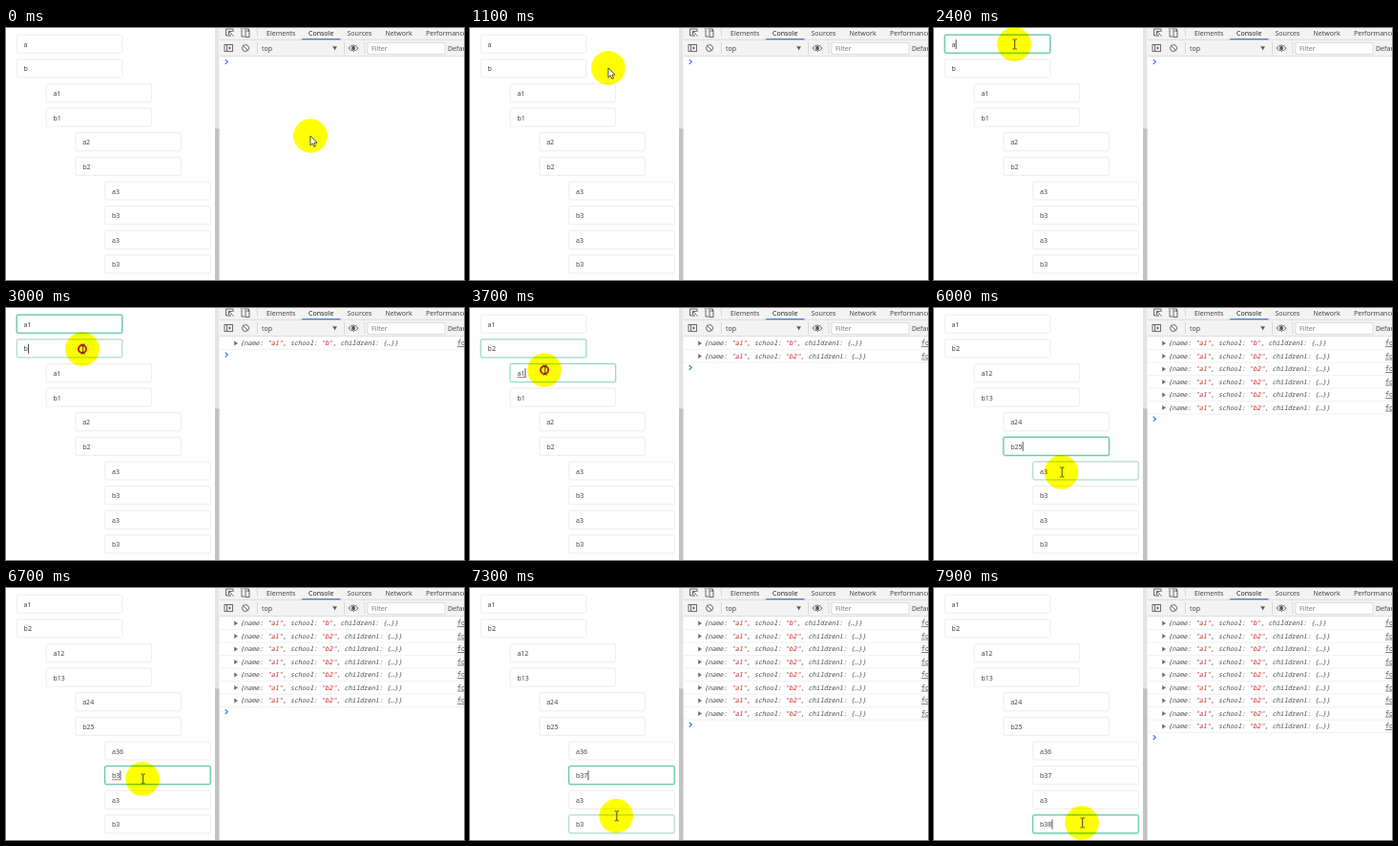
An HTML page for the animation above (8000 ms loop, 480 by 264 pixels).

```html
<!DOCTYPE html>
<html lang="en">
<head>
<meta charset="utf-8">
<style>
html, body { margin: 0; width: 100%; height: 100%; overflow: hidden; background: #fff; }
svg { display: block; width: 480px; height: 264px; }
text { font: 7px "Noto Sans", "Open Sans", sans-serif; fill: #444; white-space: pre; }
.log text { font: italic 6.74px "Noto Sans Mono", "DejaVu Sans Mono", monospace; }
.str { fill: #c41a16; }
.line { stroke: #d4d4d4; stroke-width: .8; fill: none; }
.icon { stroke: #5a5a5a; stroke-width: .9; fill: none; }
</style>
</head>
<body>
<svg id="stage" viewBox="0 0 480 264">
  <rect width="480" height="264" fill="#fff"/>
  <g id="form"></g>
  <g id="tools">
    <rect x="219" width="4.5" height="264" fill="#e4e4e4"/>
    <rect x="219" y="105.5" width="4.5" height="159" fill="#c2c2c2"/>
    <rect x="223.5" width="257" height="29.3" fill="#f3f3f3"/>
    <path class="line" d="M223.5 12.2H480M223.5 29.4H480M263.5 0V9M263.5 15V27M354.5 15V27M376 15V27"/>
    <rect x="310" y="11" width="40.5" height="1.4" fill="#4b84cf"/>
    <g class="icon">
      <path d="M236 8H230.5V1H238V4M233.5 3.5L238.5 8.5M233.5 3.5V7.5M233.5 3.5H237.5"/>
      <path d="M247 0V9H250M249 1H254.5V4"/>
      <rect x="251" y="3" width="4" height="6.5"/>
      <rect x="229" y="17.5" width="8.5" height="7"/>
      <path d="M231.5 17.5V24.5"/>
      <path d="M233.5 19.2V22.8L236 21Z" fill="#5a5a5a" stroke="none"/>
      <circle cx="251" cy="21" r="3.5"/>
      <path d="M248.6 18.6L253.4 23.4"/>
      <path d="M359 21Q364 15 369 21Q364 27 359 21Z"/>
      <circle cx="364" cy="21" r="1.6" fill="#5a5a5a"/>
    </g>
    <path d="M342.3 19.2H347L344.65 23.2Z" fill="#5a5a5a"/>
    <rect x="379" y="15.3" width="81" height="12" class="line" style="fill:#fff"/>
    <text x="383" y="24.2" style="fill:#808080">Filter</text>
    <text x="268" y="23.8">top</text>
    <text x="463" y="23.8">Default levels</text>
  </g>
  <g id="logs"></g>
  <path id="prompt" d="M229.7 -2.4L232.3 0L229.7 2.4" fill="none" stroke="#3b7ded" stroke-width="1.2"/>
  <circle id="halo" r="17.8" fill="#ff0" style="mix-blend-mode:multiply"/>
  <circle id="ring" r="4" fill="none" stroke="#c8201c" stroke-width="2"/>
  <path id="arrow" d="M0 0V9.8L2.3 7.8L3.9 11.3L5.5 10.6L4 7.2H7Z" fill="#fff" stroke="#222" stroke-width=".8"/>
  <path id="beam" d="M-1.5 -5H.1L.7 -4.4L1.3 -5H2.9M.7 -4.4V4.4M-1.5 5H.1L.7 4.4L1.3 5H2.9" fill="none" stroke="#333" stroke-width=".9"/>
</svg>
<script>
const LOOP = 8000, STEP = 100;
const $ = id => document.getElementById(id);
const clamp = v => Math.max(0, Math.min(1, v));
const show = (el, on) => el.setAttribute('visibility', on ? 'visible' : 'hidden');
const place = (el, x, y) => el.setAttribute('transform', `translate(${x} ${y})`);

// text, indent level, added character, click time, typing time
const fields = [
  ['a', 0, '1', 1400, 2700], ['b', 0, '2', 3000, 3300],
  ['a1', 1, '2', 3600, 4000], ['b1', 1, '3', 4300, 4500],
  ['a2', 2, '4', 4900, 5200], ['b2', 2, '5', 5500, 5700],
  ['a3', 3, '6', 6100, 6300], ['b3', 3, '7', 6500, 7000],
  ['a3', 3], ['b3', 3, '8', 7400, 7700]
].map(([text, level, add, click = Infinity, typed = Infinity], i) =>
  ({ text, add, click, typed, blur: Infinity, x: 11.3 + level * 30.8, y: 7.2 + i * 25.63 }));
const active = fields.filter(f => f.add);
active.slice(1).forEach((f, i) => active[i].blur = f.click);

// start, end, target x, target y
const moves = [
  [700, 1300, 84, 17], [2700, 3000, 80, 43], [3400, 3600, 78, 65],
  [4000, 4300, 82, 93], [4500, 4800, 110, 118], [5200, 5500, 120, 145],
  [5700, 6000, 133.5, 172], [6300, 6500, 143, 200], [7000, 7400, 155, 246]
];

for (const f of fields) {
  $('form').insertAdjacentHTML('beforeend', `<g transform="translate(${f.x} ${f.y})">
    <rect width="110.5" height="19" rx="1.5" fill="#fff" stroke="#e6e8ea" stroke-width=".8"/>
    <rect x="-.3" y="-.3" width="111.1" height="19.6" rx="2" fill="none" stroke="#19be90" stroke-width="2" opacity="0"/>
    <rect width="110.5" height="19" rx="1.5" fill="none" stroke="#52c0a0" stroke-width=".9" opacity="0"/>
    <text x="7.3" y="12.6">${f.text}</text>
    <path d="M7.3 14.2h8" stroke="#d33" stroke-width=".8"/>
    <path d="M0 4.8V14.8" stroke="#222" stroke-width=".8"/></g>`);
  [, f.glow, f.edge, f.label, f.spell, f.caret] = $('form').lastChild.children;
}

const str = s => `<tspan class="str">"${s}"</tspan>`;
const rows = active.map((f, i) => {
  const y = 37 + i * 13.5;
  $('logs').insertAdjacentHTML('beforeend', `<g class="log">
    <path d="M239.2 ${y - 2.5}V${y + 2.5}L243 ${y}Z" fill="#6e6e6e"/>
    <text x="245.4" y="${y + 2.2}">{name: ${str('a1')}, school: ${str(i ? 'b2' : 'b')}, children1: {…}}</text>
    <text x="473" y="${y + 2.2}" style="font-style:normal;text-decoration:underline">form</text>
    <path d="M224 ${y + 6.6}H480" stroke="#ededed" stroke-width=".8"/></g>`);
  return $('logs').lastChild;
});

function pointer(t) {
  let x = 319, y = 113;
  for (const [a, b, tx, ty] of moves) {
    const p = clamp((t - a) / (b - a)), e = p * p * (3 - 2 * p);
    x += (tx - x) * e;
    y += (ty - y) * e;
  }
  return [x, y];
}

function render(t) {
  const [x, y] = pointer(t);
  let over = false, clicked = false;
  for (const f of fields) {
    const hover = x > f.x && x < f.x + 110.5 && y > f.y && y < f.y + 19;
    const focused = t >= f.click && t < f.blur;
    const focus = clamp((t - f.click) / 200) * (1 - clamp((t - f.blur) / 200));
    const done = t >= f.typed;
    const since = t - (done ? f.typed : f.click);
    over = over || hover;
    clicked = clicked || (t >= f.click && t < f.click + 200);
    f.label.textContent = f.text + (done ? f.add : '');
    f.glow.setAttribute('opacity', .2 * focus);
    f.edge.setAttribute('opacity', Math.max(focus, hover ? .55 : 0));
    show(f.spell, focused && !done && f.text.length > 1);
    show(f.caret, focused && since % 1000 < 500);
    if (focused) place(f.caret, 7.9 + f.label.getComputedTextLength(), 0);
  }
  const count = active.filter(f => t >= f.typed).length;
  rows.forEach((row, i) => show(row, i < count));
  place($('prompt'), 0, 35.5 + count * 13.45);
  for (const id of ['halo', 'ring', 'arrow', 'beam']) place($(id), x, y);
  show($('ring'), clicked);
  show($('arrow'), !over);
  show($('beam'), over);
}

[['Elements', 273], ['Console', 317], ['Sources', 357.5], ['Network', 397.5], ['Performance', 440]].forEach(([name, x]) =>
  $('tools').insertAdjacentHTML('beforeend', `<text x="${x}" y="7.8"${name === 'Console' ? ' style="fill:#222"' : ''}>${name}</text>`));

const start = performance.now();
function tick() {
  const t = (performance.now() - start) % LOOP;
  render(Math.floor(t / STEP) * STEP);
  requestAnimationFrame(tick);
}
tick();
</script>
</body>
</html>
```
